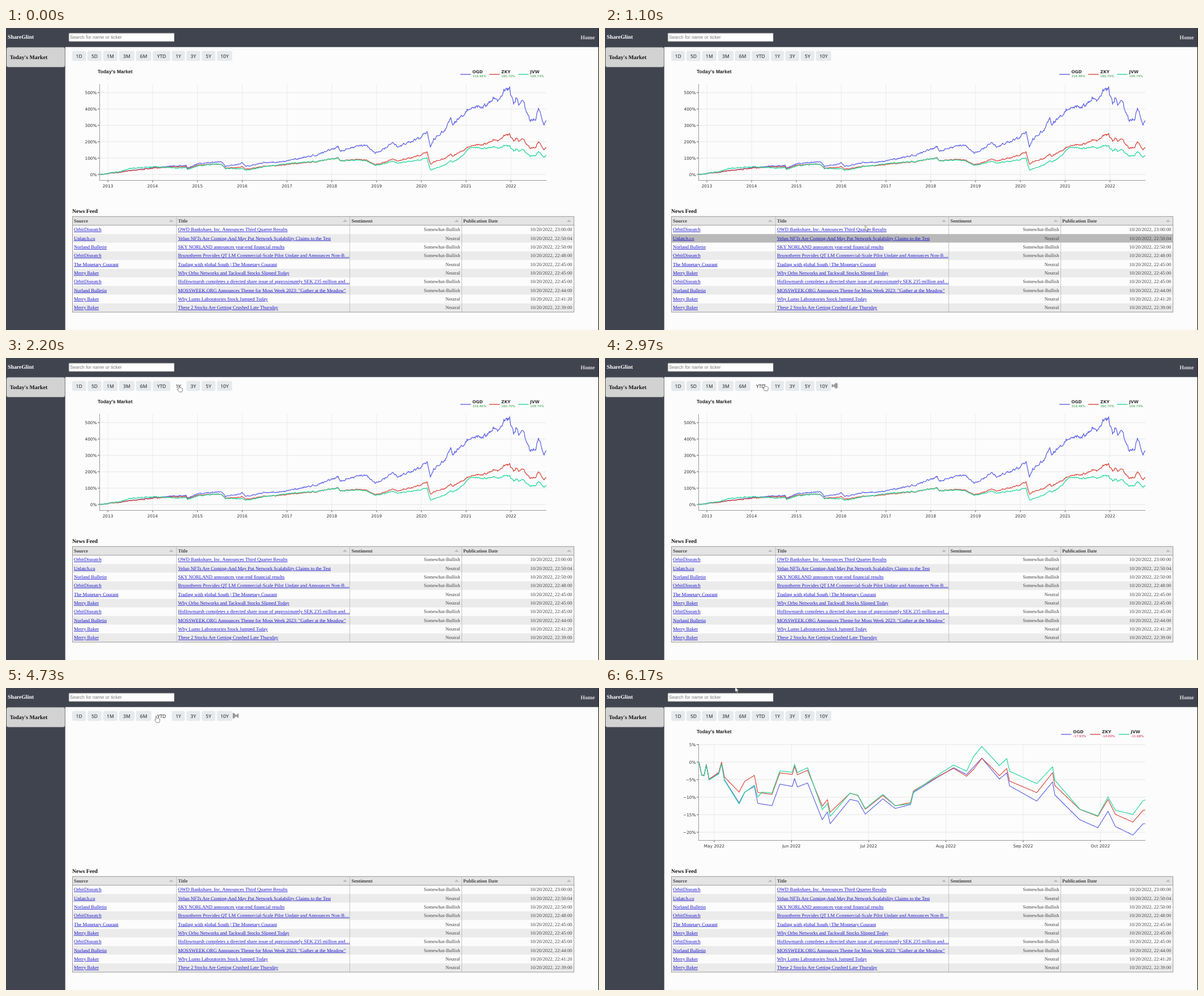
Recreate the animation shown at these times as an HTML page. Size 1048 px wide and 534 px high, loop 6270 ms.

```html
<!DOCTYPE html>
<html lang="en">
<head>
<meta charset="utf-8">
<title>Market dashboard</title>
<style>
html, body { margin: 0; width: 100%; height: 100%; overflow: hidden; background: #fcfcfc; }
svg { display: block; width: 1048px; height: 534px; }
text { white-space: pre; text-rendering: geometricPrecision; }
.serif { font-family: "Liberation Serif", serif; font-size: 8.6px; fill: #444; }
.big { font-size: 9.83px; font-weight: 700; }
.sans { font-family: "Liberation Sans", sans-serif; font-size: 8.19px; }
.plot { font-family: "DejaVu Sans", sans-serif; font-size: 7.37px; fill: #333; }
.btn { font-family: "Noto Sans", sans-serif; font-size: 8.6px; font-weight: 500; fill: #222; }
.link { fill: #1b16c8; text-decoration: underline; }
.b { font-weight: 700; }
.mid { text-anchor: middle; }
.end { text-anchor: end; }
</style>
</head>
<body>
<svg id="stage" viewBox="0 0 1048 534"></svg>
<script>
const LOOP = 6270;
const COLORS = ['#6065e6', '#d9483f', '#26d79b'];
const TICKERS = ['OGD', 'ZKY', 'JVW'];

const text = (x, y, s, cls, more = '') => `<text x="${x}" y="${y}" class="${cls}" ${more}>${s}</text>`;
const rect = (x, y, w, h, fill, more = '') => `<rect x="${x}" y="${y}" width="${w}" height="${h}" fill="${fill}" ${more}/>`;
const line = (x1, y1, x2, y2, color, w = 1) => `<path d="M${x1} ${y1}L${x2} ${y2}" stroke="${color}" stroke-width="${w}"/>`;
const points = s => s.trim().split(/\s+/).map(p => p.split(',').map(Number));

// Linear interpolation through [position, ...values] rows
function along(rows, at) {
  if (at <= rows[0][0]) return rows[0].slice(1);
  const i = rows.findIndex(r => r[0] >= at);
  if (i < 0) return rows[rows.length - 1].slice(1);
  const a = rows[i - 1], b = rows[i], k = (at - a[0]) / (b[0] - a[0]);
  return a.slice(1).map((v, j) => v + (b[j + 1] - v) * k);
}

// ---- charts: the lead line has turning points, the other two follow it at a varying spread ----
const BASE = 259;
const scaled = (y, ratio) => BASE - (BASE - y) * ratio;
const shifted = (y, gap) => y + gap;

const tenYears = {
  step: 1, noise: y => 1 + (BASE - y) * 0.045, width: 1.3, follow: scaled,
  x: [...Array(10)].map((_, i) => [180 + i * 79.15, 2013 + i]),
  y: [...Array(6)].map((_, i) => [BASE - i * 28.95, i ? i + '00%' : '0%']),
  legend: 803, change: ['316.46%', '160.70%', '109.74%'], tint: '#2f9a3c',
  lead: `166,259 200,255 260,247 318,243 321,248 340,240 380,236 388,245 417,239 424,245 462,237
    490,236 550,224 587,210 591,217 636,206 643,214 653,222 685,203 691,210 730,195 744,183 750,212
    756,197 778,178 786,156 789,170 820,140 850,137 862,123 870,130 880,110 890,108 897,136 902,122
    906,140 911,123 926,164 936,160 941,140 951,170 954,168`,
  spread: [
    '166,1 365,.85 424,.65 490,.74 587,.6 653,.46 744,.53 751,.36 786,.36 820,.43 911,.48 954,.5',
    '166,1 220,1.5 300,.75 372,.85 419,.5 488,.8 587,.59 653,.43 744,.39 751,.15 800,.28 820,.41 892,.33 954,.35']
};
const oneYear = {
  step: 3.14, noise: () => 6, width: 1.3, follow: shifted,
  x: ['Nov 2021', 'Jan 2022', 'Mar 2022', 'May 2022', 'Jul 2022', 'Sep 2022'].map((s, i) => [194 + i * 131.2, s]),
  y: [...Array(4)].map((_, i) => [138.3 + i * 40, i ? `−${i}0%` : '−0%']),
  legend: 806, change: ['-27.96%', '-18.23%', '-24.20%'], tint: '#cf2347',
  lead: `166,139 190,125 201,113 234,108 250,111 263,129 275,114 292,130 301,114 330,109 340,133
    355,128 368,163 382,174 392,149 407,145 420,168 440,185 446,168 481,198 492,165 514,144 541,177
    556,170 582,206 592,197 607,236 628,227 640,207 660,205 685,249 704,225 716,238 784,200 815,182
    855,223 873,205 890,225 915,257 943,260 955,250`,
  spread: [
    '166,0 234,13 263,7 330,5 368,-12 440,-18 481,-30 514,-15 607,-38 815,-26 855,-33 955,-39',
    '166,0 203,-3 260,32 275,24 299,46 355,27 408,28 446,10 481,-3 510,28 555,8 607,0 895,1 943,-17']
};
const sixMonths = {
  step: 1, noise: () => 0, width: 1.2, follow: shifted,
  x: ['May', 'Jun', 'Jul', 'Aug', 'Sep', 'Oct'].map((m, i) => [193 + i * 136.5, m + ' 2022']),
  y: [...Array(6)].map((_, i) => [100 + i * 31, `${5 - i * 5}%`.replace('-', '−')]),
  legend: 806, change: ['-17.93%', '-14.00%', '-11.68%'], tint: '#cf2347',
  lead: `166,131 171,154 175,155 179,136 184,162 201,151 206,133 211,162 237,203 247,184 264,174
    270,204 295,208 309,170 331,174 335,160 340,175 358,168 384,233 393,219 398,240 433,197 447,200
    460,223 491,196 513,213 540,206 545,185 589,157 616,141 639,153 666,124 697,161 710,150 715,173
    763,200 791,166 795,189 839,233 871,247 889,218 902,245 933,260 951,240`,
  spread: [
    '166,0 206,-2 237,-19 309,-20 384,-24 433,-11 491,-6 602,0 652,4 683,-4 763,-15 955,-24',
    '166,0 237,2 264,-2 277,-21 358,-27 398,-13 491,-8 540,-1 639,-6 652,-19 763,-31 839,-19 871,-21 955,-42']
};

function leadLine(chart) {
  const turns = points(chart.lead), out = [];
  let seed = 17, drift = 0;
  for (let x = 166; x <= 955.1; x += chart.step) {
    const [y] = along(turns, x);
    seed = (seed * 16807) % 2147483647;
    drift = drift * 0.5 + (seed / 2147483647 - 0.5) * chart.noise(y);
    out.push([x, y + drift]);
  }
  return out;
}

function drawChart(chart, id) {
  let s = `<g id="${id}">` + text(162, 80, "Today's Market", 'sans b', 'style="font-size:8.6px" fill="#222"');
  for (const [x, label] of chart.x)
    s += line(x, 99, x, 269, '#ebebf0') + line(x, 269, x, 272.5, '#555') + text(x, 282, label, 'plot mid');
  for (const [y, label] of chart.y)
    s += line(166, y, 955, y, '#e6e6ea') + line(162, y, 165, y, '#555') + text(160.5, y + 2.7, label, 'plot end');
  s += line(165.5, 99, 165.5, 269.5, '#999') + line(165, 269.5, 955, 269.5, '#999');

  const lead = leadLine(chart);
  TICKERS.forEach((name, k) => {
    const gap = k && points(chart.spread[k - 1]);
    const d = lead.map(([x, y]) => `${x.toFixed(1)} ${(k ? chart.follow(y, along(gap, x)[0]) : y).toFixed(1)}`).join('L');
    const x = chart.legend + k * 51;
    s += `<path d="M${d}" fill="none" stroke="${COLORS[k]}" stroke-width="${chart.width}" stroke-linejoin="round"/>`
      + line(x, 82, x + 18.5, 82, COLORS[k], 1.4) + text(x + 21.3, 80, name, 'plot b')
      + text(x + 21.3, 86.6, chart.change[k], 'plot', `style="font-size:5.5px;fill:${chart.tint}"`);
  });
  return s + '</g>';
}

// ---- page ----
let left = 117;
const buttons = [['1D', 24.3], ['5D', 25], ['1M', 25.3], ['3M', 27.3], ['6M', 27], ['YTD', 31],
  ['1Y', 23], ['3Y', 24.3], ['5Y', 24.3], ['10Y', 27]].map(([label, w]) => {
  const a = left;
  left += w + 2.7;
  return { label, a, w };
});

const bull = 'Somewhat-Bullish', flat = 'Neutral';
const news = [
  ['OrbitDispatch', 'OWD Bankshare, Inc. Announces Third Quarter Results', bull, '23:00:00'],
  ['Unlatch.co', 'Velun NFTs Are Coming-And May Put Network Scalability Claims to the Test', flat, '22:50:04'],
  ['Norland Bulletin', 'SKY NORLAND announces year-end financial results', bull, '22:50:00'],
  ['OrbitDispatch', 'Brunotherm Provides QT LM Commercial-Scale Pilot Update and Announces Non-B…', bull, '22:48:00'],
  ['The Monetary Courant', 'Trading with global South | The Monetary Courant', flat, '22:45:00'],
  ['Merry Baker', 'Why Orbo Networks and Tackwall Stocks Slipped Today', flat, '22:45:00'],
  ['OrbitDispatch', 'Hollowmarsh completes a directed share issue of approximately SEK 235 million and…', bull, '22:45:00'],
  ['Norland Bulletin', 'MOSSWEEK.ORG Announces Theme for Moss Week 2023: "Gather at the Meadow"', bull, '22:44:00'],
  ['Merry Baker', 'Why Lumo Laboratories Stock Jumped Today', flat, '22:41:20'],
  ['Merry Baker', 'These 2 Stocks Are Getting Crushed Late Thursday', flat, '22:39:00']];
const ROW = 15.33, TOP = 349;
const rowFill = i => i % 2 ? '#ebebeb' : '#fcfcfc';

function drawTable() {
  let s = text(117, 327, 'News Feed', 'serif big', 'style="fill:#111"') + rect(117, 333, 887, 16, '#e4e4e4');
  [['Source', 120, 292], ['Title', 304, 599], ['Sentiment', 610.5, 796.5], ['Publication Date', 808, 995]].forEach(([name, x, arrow]) => {
    s += text(x, 343.5, name, 'serif b') + `<path d="M${arrow - 4} 342.7h8l-4 -4z" fill="#bbb"/>`;
  });
  news.forEach(([source, title, mood, time], i) => {
    const y = TOP + i * ROW, base = y + 10.2;
    s += rect(117, y, 887, ROW, rowFill(i), 'class="row"')
      + text(120, base, source, 'serif link') + text(304, base, title, 'serif link')
      + text(802.5, base, mood, 'serif end') + text(1000.5, base, '10/20/2022, ' + time, 'serif end');
  });
  for (const x of [301.3, 607.5, 805.5]) s += line(x, 333, x, 502, '#b5b5b5', 0.8);
  return s + line(117, 348.8, 1004, 348.8, '#999') + rect(117.5, 333.3, 886.3, 169, 'none', 'stroke="#999"');
}

const stage = document.getElementById('stage');
stage.innerHTML =
  rect(0, 0, 1048, 534, '#fcfcfc') + rect(0, 0, 1048, 33.7, '#40444f') + rect(0, 0, 104.7, 534, '#40444f')
  + rect(1046.8, 0, 1.2, 534, '#25272c')
  + text(3, 18.6, 'ShareGlint', 'serif big', 'style="fill:#fff"')
  + text(1015.5, 20.3, 'Home', 'serif big', 'style="fill:#ddd"')
  + rect(111, 9, 186.5, 15, '#fff', 'rx="1" stroke="#777"')
  + text(113, 19, 'Search for name or ticker', 'sans', 'fill="#757575"')
  + rect(1, 34.3, 103, 34.7, '#d2d2d2', 'rx="3" stroke="#aaa" stroke-width=".6"')
  + text(6.7, 54.6, "Today's Market", 'serif big', 'style="fill:#111"')
  + buttons.map(({ label, a, w }) => rect(a, 40.5, w, 17.7, '#e7eaec', 'rx="3" class="pill"')
    + text(a + w / 2, 52.6, label, 'btn mid')).join('')
  + '<g id="spinner">' + [...Array(5)].map((_, i) => rect(401 + i * 2.1, 44, 1.2, 10, '#555', 'class="bar"')).join('') + '</g>'
  + drawChart(tenYears, 'ten') + drawChart(oneYear, 'year') + drawChart(sixMonths, 'half')
  + `<g id="tools" fill="#cbcbcb"><path d="M966 66.5h2.7l1-1.7h3l1 1.7h2.6v6.3h-10.3z"/><circle cx="971.2" cy="69.5" r="2" fill="#fcfcfc"/>
     <path d="M986 69.2l4.8-4.5 4.8 4.5h-1.3v3.8h-2.4v-2.6h-2.2v2.6h-2.4v-3.8z"/></g>`
  + drawTable()
  + `<g id="cursor" fill="#fff" stroke="#555" stroke-width=".7" stroke-linejoin="round">
     <path id="arrow" d="M0 0V9L2.1 7.2 3.6 10.4 5 9.8 3.6 6.7H6.3Z"/>
     <path id="hand" d="M-.8 .8Q0-.5 .9 .8V4.4Q5 4 6.4 6V9L5.5 12H.2L-2.7 7.7Q-2.7 6.2-.8 7.3Z"/></g>`;

const byId = id => document.getElementById(id);
const all = cls => [...stage.querySelectorAll('.' + cls)];
const show = (id, on) => byId(id).style.display = on ? '' : 'none';
const rows = all('row'), pills = all('pill'), bars = all('bar');

// time, x, y of the pointer tip
const pointer = points(`700,505,497 870,500,494 1070,465,371 1100,460,350 1630,346,27 2070,306,48 2800,304,48
  2970,282,46 3470,275,48 4330,273,49 4730,265.5,49 4930,246,49 5600,244,48 6170,230,-2`);

function render(t) {
  const [x, y] = along(pointer, t), [hx, hy] = along(pointer, t - 30);
  const live = t >= 700;
  const hotRow = live && hx > 117 && hx < 1004 ? Math.floor((hy - TOP) / ROW) : -1;
  rows.forEach((r, i) => r.setAttribute('fill', i === hotRow ? '#b9b9b9' : rowFill(i)));
  let onButton = false;
  pills.forEach((p, i) => {
    const { a, w } = buttons[i];
    const hot = live && hy > 40 && hy < 58 && hx >= a && hx <= a + w;
    onButton = onButton || hot;
    p.setAttribute('fill', hot ? '#fcfcfc' : '#e7eaec');
  });

  show('ten', t < 3470);
  show('year', t >= 3700 && t < 4700);
  show('half', t >= 4950);
  show('tools', t >= 1180 && t < 1700);
  show('spinner', t >= 2500 && t < 3700 || t >= 3800 && t < 5000);
  bars.forEach((b, i) => {
    const h = 6.5 + 3.5 * Math.sin(t / 120 - i * 1.3);
    b.setAttribute('y', 49 - h / 2);
    b.setAttribute('height', h);
  });

  show('cursor', live);
  show('arrow', !onButton);
  show('hand', onButton);
  byId('cursor').setAttribute('transform', `translate(${x} ${y})`);
}

const start = performance.now();
function tick() {
  render((performance.now() - start) % LOOP);
  requestAnimationFrame(tick);
}
render(0);
requestAnimationFrame(tick);
</script>
</body>
</html>
```
